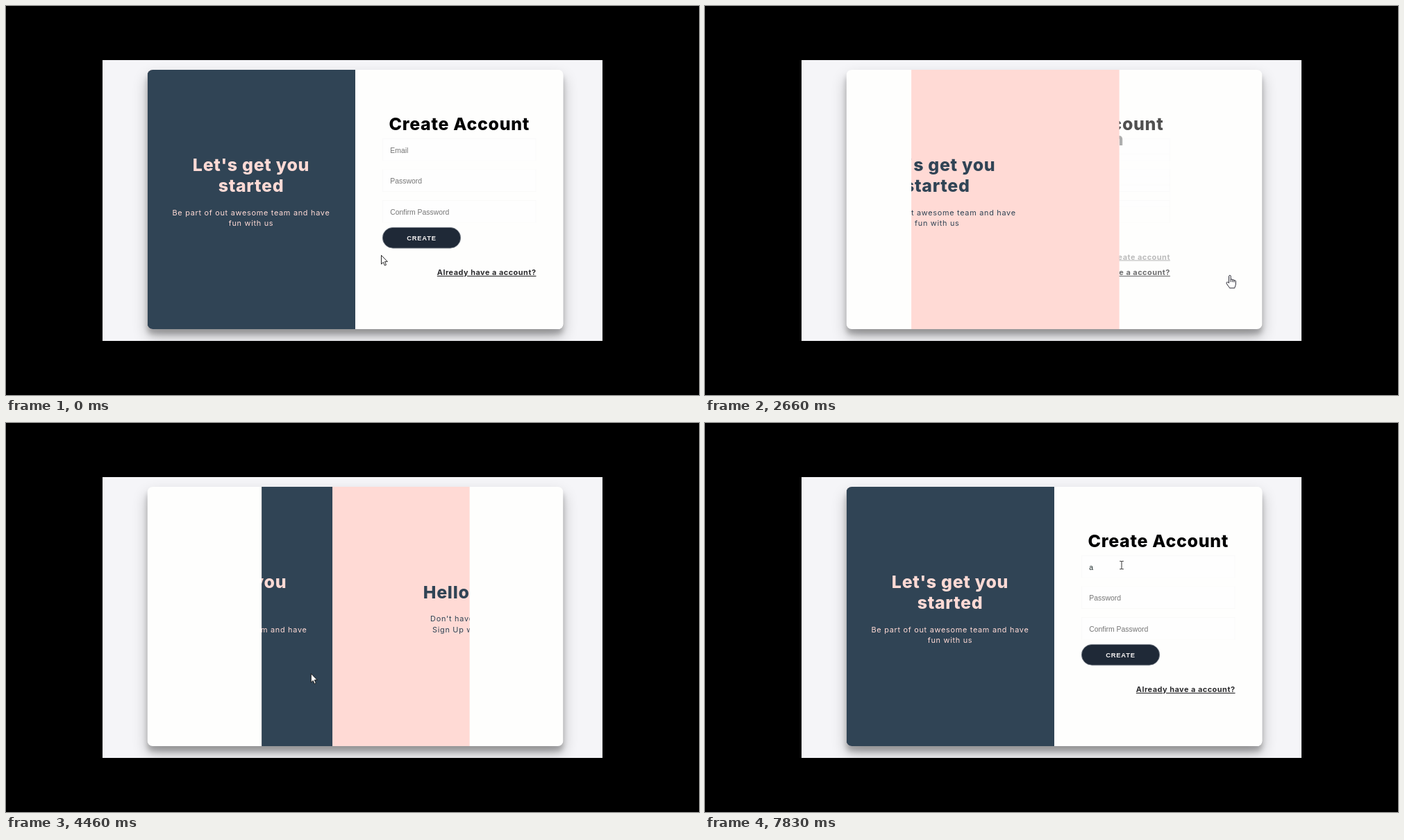
An HTML page for the animation above (8 s loop, 998 by 561 pixels).

```html
<!DOCTYPE html>
<html lang="en">
<head>
<meta charset="utf-8">
<title>Sliding account form</title>
<style>
html, body { margin: 0; width: 100%; height: 100%; overflow: hidden; background: #000; }
svg { display: block; width: 998px; height: 561px; }
text { font-family: Inter, "Open Sans", sans-serif; font-optical-sizing: none; }
.title { font-size: 24.96px; font-weight: 800; letter-spacing: .7px; text-anchor: middle; }
.note { font-size: 10.92px; letter-spacing: .7px; text-anchor: middle; }
.link { font-size: 10.92px; font-weight: 700; letter-spacing: .5px; text-anchor: end; text-decoration: underline; fill: #2b2b2d; }
.hint, .button { font-family: "Liberation Sans", Arial, sans-serif; }
.hint { font-size: 10.4px; fill: #757575; }
.button { font-size: 9.36px; font-weight: 700; letter-spacing: .78px; }
</style>
</head>
<body>
<svg viewBox="0 0 998 561" xmlns="http://www.w3.org/2000/svg">
  <defs>
    <clipPath id="pageClip"><rect x="139" y="78" width="720" height="405"/></clipPath>
    <clipPath id="cardClip"><rect x="203.5" y="92" width="599" height="374" rx="7.8"/></clipPath>
    <clipPath id="overlayClip"><rect id="window" y="92" width="299.5" height="374"/></clipPath>
    <filter id="wide" x="-20%" y="-20%" width="140%" height="140%"><feGaussianBlur stdDeviation="10.9"/></filter>
    <filter id="tight" x="-20%" y="-20%" width="140%" height="140%"><feGaussianBlur stdDeviation="3.9"/></filter>
  </defs>
  <rect width="998" height="561"/>
  <g clip-path="url(#pageClip)">
    <rect x="139" y="78" width="720" height="405" fill="#f5f5f8"/>
    <rect x="203.5" y="102.9" width="599" height="374" rx="7.8" opacity=".25" filter="url(#wide)"/>
    <rect x="203.5" y="99.8" width="599" height="374" rx="7.8" opacity=".22" filter="url(#tight)"/>
  </g>
  <g clip-path="url(#cardClip)">
    <rect x="203.5" y="92" width="599" height="374" fill="#fefefd"/>
    <g id="signIn"></g>
    <g id="signUp"></g>
    <g clip-path="url(#overlayClip)">
      <rect x="203.5" y="92" width="599" height="374" fill="#ffdad5"/>
      <g id="leftPanel">
        <rect id="leftBack" x="203.5" y="92" width="299.5" height="374" fill="#304455"/>
        <text class="title" x="353" y="238">Let's get you</text>
        <text class="title" x="353" y="268.4">started</text>
        <text class="note" x="353" y="301.8">Be part of out awesome team and have</text>
        <text class="note" x="353" y="317.4">fun with us</text>
      </g>
      <g id="rightPanel" fill="#304455">
        <text class="title" x="652.5" y="252.6">Hello, There</text>
        <text class="note" x="652.5" y="286">Don't have an account?</text>
        <text class="note" x="652.5" y="301.6">Sign Up with us today!</text>
      </g>
    </g>
  </g>
  <rect id="caret" y="202" width="1" height="12" fill="#222"/>
  <g id="cursor" stroke-linejoin="round">
    <path id="arrow" d="M.5 .5V13.2L3.4 10.5 5.4 15.2 7.5 14.3 5.5 9.7H9.4Z" fill="#fff" stroke="#111" stroke-width=".9"/>
    <path id="hand" d="M-1.5 11.5V1.7C-1.5 0 1.2 0 1.2 1.7V7C1.6 5.6 3.7 5.8 3.8 7.2 4.3 6.3 5.9 6.5 6 8 6.8 7.2 8.3 7.6 8.3 9V13C8.3 15.5 7 16.5 6.8 18.8H-.5C-1 17-5 13.3-5 11.3-5 9.8-3 9.6-1.5 11.5ZM1.2 7V10M3.8 7.2V10.2M6 8V10.4" fill="#fff" stroke="#1c1c28" stroke-width=".95"/>
    <path id="beam" d="M-2.8-5.7H-.8L0-5.2 .8-5.7H2.8M0-5.2V5.2M-2.8 5.7H-.8L0 5.2 .8 5.7H2.8" fill="none" stroke="#333" stroke-width="1"/>
  </g>
</svg>
<script>
const LOOP = 8000, SLIDE = 600, HALF = 299.5, LEFT = 203.5;
const TO_SIGN_IN = 2434, TO_SIGN_UP = 4184;
const $ = id => document.getElementById(id);
const set = (id, name, value) => $(id).setAttribute(name, value);
const shift = (id, x, y = 0) => set(id, 'transform', `translate(${x} ${y})`);
const show = (id, on) => set(id, 'visibility', on ? 'visible' : 'hidden');
const clamp = v => Math.min(1, Math.max(0, v));
const smooth = u => u * u * (3 - 2 * u);

// Both forms are laid out over the left half of the card.
function form(id, title, titleY, hints, firstY, button, link) {
  const fields = hints.map((hint, i) => {
    const y = firstY + i * 44.5;
    return `<rect x="243" y="${y - 16}" width="220.5" height="31.5" fill="#fefefe" stroke="#f9f9f9" stroke-width=".8"/>
      <text class="hint" x="253.8" y="${y + 4}">${hint}</text>`;
  }).join('');
  $(id).innerHTML = `<rect x="${LEFT}" y="92" width="${HALF}" height="374" fill="#fefefd"/>
    <text class="title" x="353.2" y="${titleY}">${title}</text>${fields}
    <rect x="242.8" y="${button.y}" width="${button.width}" height="29.8" rx="14.9" fill="${button.fill}" stroke="${button.edge}" stroke-width=".8"/>
    <text class="button" x="277.8" y="${button.y + 18.2}" fill="${button.ink}">${button.label}</text>
    <text class="link" x="464" y="${link.y}">${link.label}</text>`;
}

form('signIn', 'Sign in', 201, ['Email', 'Password'], 229.5,
  { label: 'LOGIN', y: 296.7, width: 104.6, fill: '#e7aea7', edge: '#eebfb9', ink: '#fdeeeb' },
  { label: 'Create account', y: 365.5 });
form('signUp', 'Create Account', 179.4, ['Email', 'Password', 'Confirm Password'], 207.5,
  { label: 'CREATE', y: 319.4, width: 112.4, fill: '#1f2937', edge: '#79818b', ink: '#f6f3f3' },
  { label: 'Already have a account?', y: 388 });
const emailHint = document.querySelector('#signUp .hint');

// CSS ease-in-out: cubic-bezier(.42, 0, .58, 1)
function easeInOut(x) {
  let low = 0, high = 1;
  for (let i = 0; i < 24; i++) {
    const s = (low + high) / 2, r = 1 - s;
    if (1.26 * r * r * s + 1.74 * r * s * s + s ** 3 < x) low = s; else high = s;
  }
  return smooth(low);
}

// Pointer moves: start, end, x, y and an optional bend point
const moves = [
  [0, 633, 613, 334],
  [1300, 1500, 521, 333],
  [1667, 2066, 756, 388, 790, 465],
  [2940, 3200, 391, 360],
  [3433, 3533, 391, 351],
  [3667, 3833, 397, 360],
  [4288, 5000, 662, 389, 530, 361],
  [5110, 5700, 600, 205]
];

function pointerAt(t) {
  let x = 540, y = 359;
  for (const [start, end, endX, endY, bendX = (x + endX) / 2, bendY = (y + endY) / 2] of moves) {
    if (t < start) break;
    const u = smooth(clamp((t - start) / (end - start))), r = 1 - u;
    x = r * r * x + 2 * r * u * bendX + u * u * endX;
    y = r * r * y + 2 * r * u * bendY + u * u * endY;
  }
  return [x, y];
}

function pointerKind(x, y, t) {
  const inside = (left, top, right, bottom) => x >= left && x <= right && y >= top && y <= bottom;
  if (t > 2940 && t < TO_SIGN_UP) return inside(375, 355, 463, 369) ? 'hand' : 'arrow';
  if (inside(620, 377, 763, 391)) return 'hand';
  return [191, 236, 280].some(top => inside(542, top, 763, top + 32)) ? 'beam' : 'arrow';
}

function draw(time) {
  // Step at 30 pictures per second, on a 10 ms grid.
  const step = Math.ceil((Math.floor(time / 10) * 10 + 10) * .03 - 1e-6) - 1;
  const t = step * 100 / 3;
  const away = clamp((t - TO_SIGN_IN) / SLIDE), back = clamp((t - TO_SIGN_UP) / SLIDE);
  const returning = t >= TO_SIGN_UP;
  const signUpActive = t < TO_SIGN_IN || returning;
  const slide = returning ? 1 - easeInOut(back) : easeInOut(away);

  shift('signIn', HALF * (1 - slide));
  shift('signUp', HALF * (1 - slide));
  const fade = slide < .625 ? 1 - slide : 0;
  set('signUp', 'opacity', returning ? +(back >= .5) : fade);
  set('window', 'x', LEFT + HALF * slide);
  shift('leftPanel', -.2 * HALF * slide);
  shift('rightPanel', .2 * HALF * (1 - slide));
  show('leftBack', signUpActive);
  set('leftPanel', 'fill', signUpActive ? '#ffdad5' : '#304455');

  const typed = t >= 7290;
  emailHint.textContent = typed ? 'a' : 'Email';
  emailHint.style.fill = typed ? '#1c2a2a' : '';
  show('caret', (t > 5850 && t < 6420) || (t > 6920 && t < 7820));
  set('caret', 'x', typed ? 560 : 554.5);

  const [x, y] = pointerAt(t), kind = pointerKind(x, y, t);
  shift('cursor', x, y);
  for (const id of ['arrow', 'hand', 'beam']) show(id, id === kind);
}

const began = performance.now();
function tick() {
  draw((performance.now() - began) % LOOP);
  requestAnimationFrame(tick);
}
tick();
</script>
</body>
</html>
```
